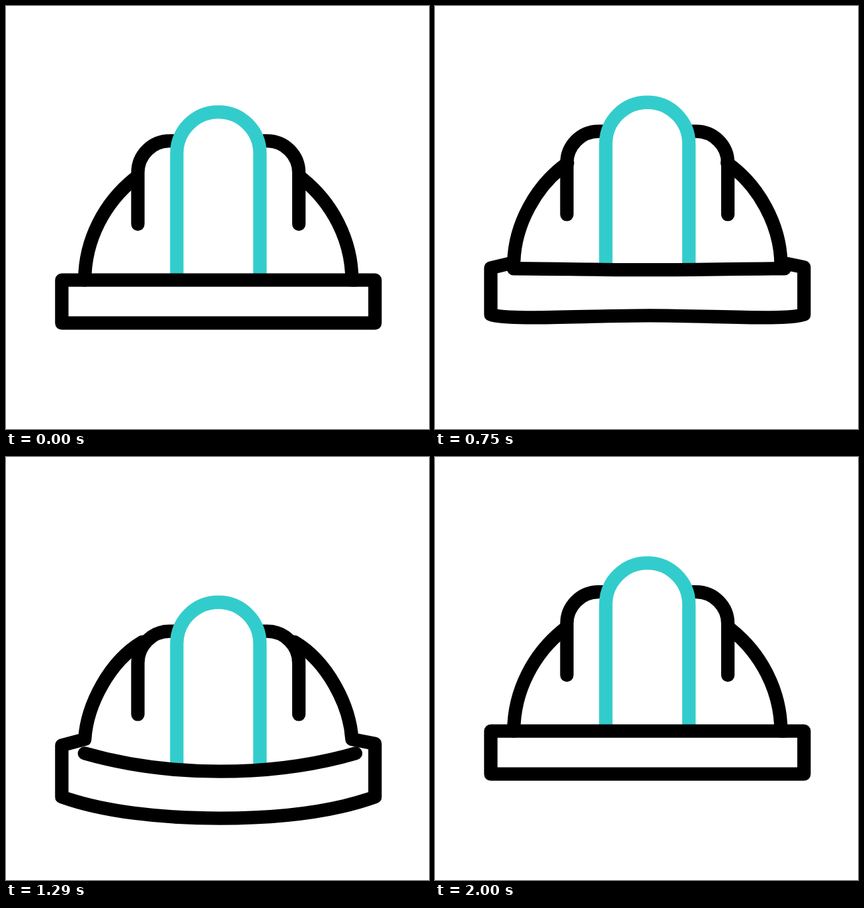
An HTML page that plays this animation: 640x640 px, repeating every 3 s.

```html
<!DOCTYPE html>
<html lang="en">
<head>
<meta charset="utf-8">
<title>Hard hat</title>
<style>
  html, body { margin: 0; width: 100%; height: 100%; overflow: hidden; background: #fff; }
  svg { display: block; width: 100%; height: 100%; }
  path { fill: none; stroke: #000; stroke-width: 20.3; stroke-linecap: round; stroke-linejoin: round; }
  #crest { stroke: #33cccc; stroke-linecap: butt; }
</style>
</head>
<body>
<svg viewBox="0 0 640 640">
  <path id="shell"/>
  <g id="top">
    <path d="M199.5 330V252.2A48 48 0 0 1 247.5 204.2H257M443.1 330V252.2A48 48 0 0 0 395.1 204.2H386"/>
    <path id="crest" d="M258.4 415V223.2A62.9 62.9 0 0 1 384.2 223.2V415"/>
  </g>
  <path id="band"/>
</svg>
<script>
const LOOP = 3000, FPS = 24, CENTER = 321.3, MID = 324;

// Heights of the parts, then curve handles as [x, y] pairs.
const rest = {
  top: 0, foot: 414.7, rimL: 414.7, rimR: 414.7,
  base: 479.7, baseMid: 479.7, baseOut: [0, 0], baseIn: 0,
  band: 414.7, bandMid: 414.7, bandOut: [0, 0], bandIn: 0,
  domeLow: [119.3, 354], domeHigh: [149, 297], domeEnd: [196, 260]
};
const high = {
  top: -62, foot: 364.7, rimL: 371.7, rimR: 371.7,
  base: 436.7, baseMid: 417.8, baseOut: [0, 0], baseIn: 90,
  band: 365.2, bandMid: 350.2, bandOut: [68, -11], bandIn: 85,
  domeLow: [119.3, 304], domeHigh: [149.5, 249], domeEnd: [196, 212]
};
const low = {
  top: 69, foot: 429, rimL: 439.7, rimR: 436.7,
  base: 519.7, baseMid: 557.3, baseOut: [72, 26], baseIn: 105,
  band: 453.7, bandMid: 485.5, bandOut: [70, 20], bandIn: 85,
  domeLow: [123, 378], domeHigh: [158, 311], domeEnd: [208, 283]
};

// Times are in steps of 1/24 s; ease holds the two x handles of the curve.
const moves = [
  { from: rest, to: high, start: 0, end: 13.1, ease: [0.45, 0.55] },
  { from: high, to: low, start: 13.1, end: 24.8, ease: [0.42, 0.58] },
  { from: low, to: rest, start: 24.8, end: 48, ease: [0.46, 0.52] }
];

const lerp = (a, b, p) => Array.isArray(a) ? a.map((v, i) => lerp(v, b[i], p)) : a + (b - a) * p;

function bezierEase(x, [a, b]) {
  let lo = 0, hi = 1;
  for (let i = 0; i < 30; i++) {
    const s = (lo + hi) / 2, r = 1 - s;
    if (3 * a * s * r * r + 3 * b * s * s * r + s * s * s < x) lo = s; else hi = s;
  }
  return lo * lo * (3 - 2 * lo);
}

function poseAt(step) {
  const move = moves.find(m => step < m.end);
  if (!move) return rest;
  const p = bezierEase((step - move.start) / (move.end - move.start), move.ease);
  return Object.fromEntries(Object.keys(rest).map(k => [k, lerp(move.from[k], move.to[k], p)]));
}

// Two cubic halves that meet in the middle of the brim.
const sag = (x1, x2, y, mid, [ox, oy], inner) =>
  `C${x1 + ox} ${y + oy} ${MID - inner} ${mid} ${MID} ${mid}` +
  `C${MID + inner} ${mid} ${x2 - ox} ${y + oy} ${x2} ${y}`;

const mirror = ([x, y]) => [2 * CENTER - x, y];
const el = id => document.getElementById(id);
const shell = el('shell'), band = el('band'), topPart = el('top');

function draw(p) {
  const foot = [119.2, p.foot];
  shell.setAttribute('d',
    `M${p.domeEnd}C${p.domeHigh} ${p.domeLow} ${foot}L84.4 ${p.rimL}V${p.base}` +
    sag(84.4, 558.3, p.base, p.baseMid, p.baseOut, p.baseIn) +
    `V${p.rimR}L${mirror(foot)}C${mirror(p.domeLow)} ${mirror(p.domeHigh)} ${mirror(p.domeEnd)}`);
  band.setAttribute('d', `M118.8 ${p.band}` +
    sag(118.8, 529, p.band, p.bandMid, p.bandOut, p.bandIn));
  topPart.setAttribute('transform', `translate(0 ${p.top})`);
}

const began = performance.now();
function tick() {
  const t = (performance.now() - began) % LOOP;
  draw(poseAt(Math.floor((t + 5) * FPS / 1000)));
  requestAnimationFrame(tick);
}
tick();
</script>
</body>
</html>
```
